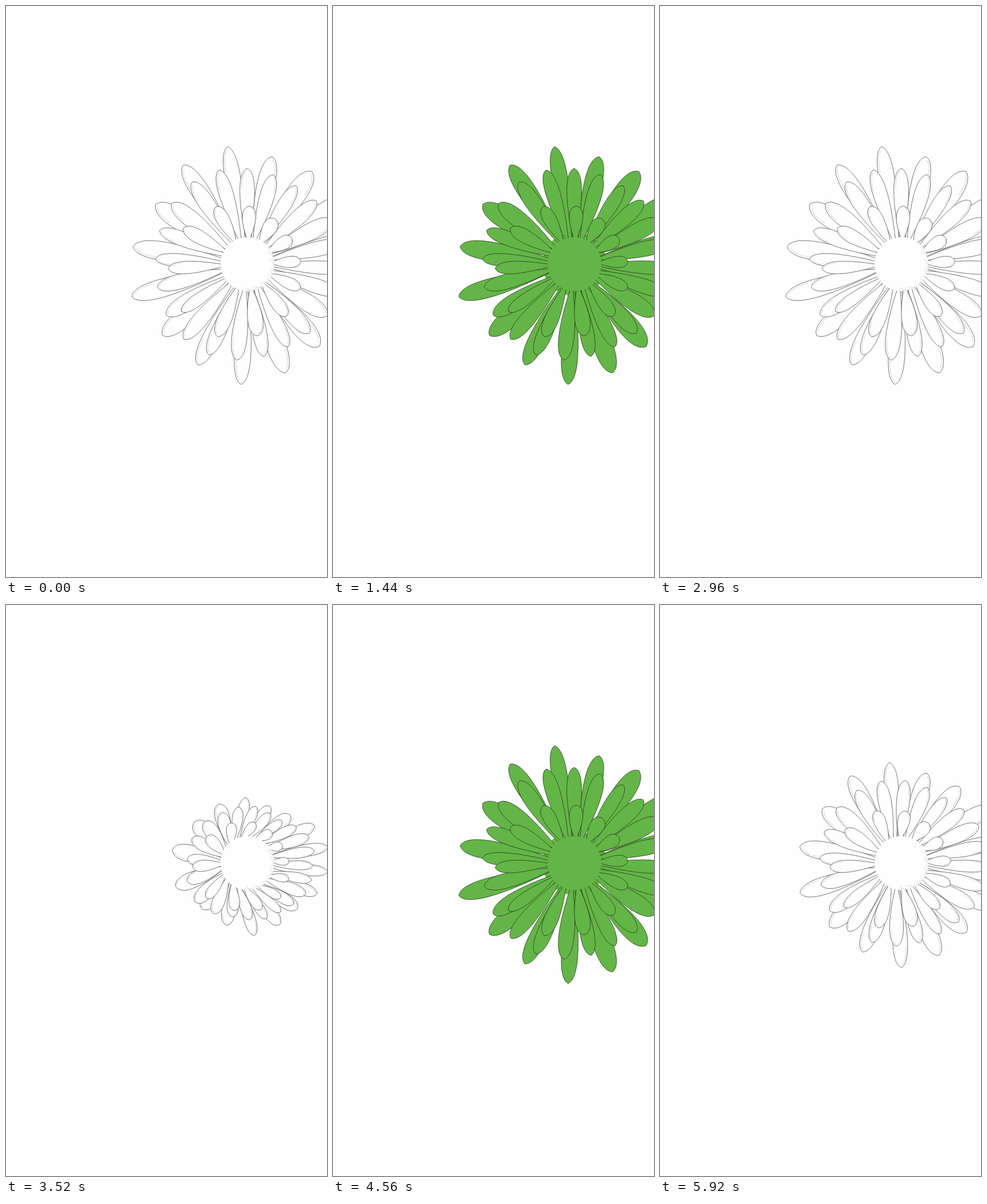
These frames come from a looping animation (561x998 px, 6.08 s). An HTML page with a canvas:

```html
<!DOCTYPE html>
<html lang="en">
<head>
<meta charset="utf-8">
<title>Flower</title>
<style>
  html, body { margin: 0; height: 100%; overflow: hidden; background: #fefefe; }
  canvas { display: block; width: 100%; height: 100%; }
</style>
</head>
<body>
<canvas id="stage" width="561" height="998"></canvas>
<script>
const ctx = document.getElementById('stage').getContext('2d');
const LOOP = 6080, STEP = 125.8, R = 47;
const center = { x: 422, y: 451 };
const { sin, cos, PI } = Math, rad = deg => deg * PI / 180;

const white = { fill: '#fefefe', line: '#505050', width: .8, shade: '#a8a8a8' };
const green = { fill: '#64b547', line: '#23401b', width: .85 };
const blue = { fill: '#075b94', line: '#0a2b45', width: .9, shade: '#7d9bb0' };
const looks = [white, green, blue, white];

const polar = (r, a, from = center) => ({ x: from.x + r * cos(a), y: from.y + r * sin(a) });
const noise = i => sin(i * 12.9 + 4) * cos(i * 7.7);

// A ring of petals, evenly spread but a little denser at the top left.
function ring(count, phase, width, length) {
  return Array.from({ length: count }, (_, i) => {
    const even = rad(phase + i * 360 / count);
    const angle = even - rad(5) * sin(even);
    return { angle, length: length(angle), width: width * (1 + .15 * noise(i)), vary: noise(i + count) };
  });
}

const petals = [
  ...ring(16, 8, 33, a => 201 + 10 * cos(4.5 * (a - rad(250)))),
  ...ring(22, 3, 27, a => 167 + 6 * cos(3 * a)),
  ...ring(12, 27, 24, a => 116 - 22 * cos(a) + 14 * sin(a))
];

function drawPetal(base, tip, w, look) {
  const dx = tip.x - base.x, dy = tip.y - base.y, len = Math.hypot(dx, dy) || 1;
  const at = (along, side) => [
    base.x + dx * along - dy / len * side * w,
    base.y + dy * along + dx / len * side * w
  ];
  ctx.beginPath();
  ctx.moveTo(...at(0, .08));
  ctx.bezierCurveTo(...at(.36, .42), ...at(.93, .82), ...at(1, 0));
  ctx.bezierCurveTo(...at(.93, -.82), ...at(.36, -.42), ...at(0, -.08));
  ctx.fillStyle = look.fill;
  ctx.fill();
  ctx.strokeStyle = look.line;
  ctx.lineWidth = look.width;
  ctx.stroke();
  if (!look.shade) return;

  // Hatching along one edge of the tip.
  const s = dx * dy > 0 ? -1 : 1;
  ctx.beginPath();
  ctx.moveTo(...at(.74, .36 * s));
  ctx.quadraticCurveTo(...at(.92, .36 * s), ...at(.96, .06 * s));
  ctx.strokeStyle = look.shade;
  ctx.lineWidth = 2;
  ctx.setLineDash([.6, 2]);
  ctx.stroke();
  ctx.setLineDash([]);
}

function fillDisc(r, look) {
  ctx.beginPath();
  ctx.arc(center.x, center.y, r, 0, 2 * PI);
  ctx.fillStyle = look.fill;
  ctx.fill();
}

function stippleDisc(look) {
  ctx.beginPath();
  for (let i = 0; i < 60; i++) {
    const a = -.6 + i * .038, r = R - 1 - 6 * Math.abs(noise(i));
    const from = polar(r, a), to = polar(r + 1.6, a);
    ctx.moveTo(from.x, from.y);
    ctx.lineTo(to.x, to.y);
  }
  ctx.strokeStyle = look.shade;
  ctx.lineWidth = .7;
  ctx.stroke();
}

// Inner petals on the left curl over the disc.
function drawFolds(look) {
  for (let deg = 290; deg >= 110; deg -= 20) {
    const base = polar(R + 5, rad(deg));
    const heading = rad(55) * cos(rad(deg - 175) * 1.4);
    drawPetal(base, polar(38, heading, base), 15, look);
  }
}

function drawFlower(pose, look) {
  const closed = Math.min(1, .23 * pose);
  ctx.fillStyle = '#fefefe';
  ctx.fillRect(0, 0, 561, 998);
  fillDisc(R + 9, look);
  for (const { angle, length, width, vary } of petals) {
    const turn = closed * sin(angle);
    const tip = angle - .22 * turn, base = angle + .4 * turn;
    const reach = 1 - closed * (.74 - .03 * sin(tip) - .1 * cos(2 * tip)
      - .07 * closed ** 3 * cos(tip) - .07 * vary);
    const left = Math.max(0, -cos(angle));
    drawPetal(
      polar(R - 4, base),
      polar(R + (length - R) * reach, tip),
      width * (1 - closed * (.45 - .3 * left)), look
    );
  }
  fillDisc(R, look);
  if (look.shade) stippleDisc(look);
  if (pose > 3) drawFolds(look);
}

// Two rounds of 24 drawings: close, open, close, open.
function render(t) {
  const step = t < 3100 ? 1 + (t - 160) / STEP : 25 + (t - 3233.3) / STEP;
  const n = Math.max(0, Math.floor(step)) % 24, m = n % 12;
  drawFlower(m < 6 ? m : 11 - m, looks[Math.floor(n / 6)]);
}

const start = performance.now();
function tick() {
  render((performance.now() - start) % LOOP);
  requestAnimationFrame(tick);
}
tick();
</script>
</body>
</html>
```
